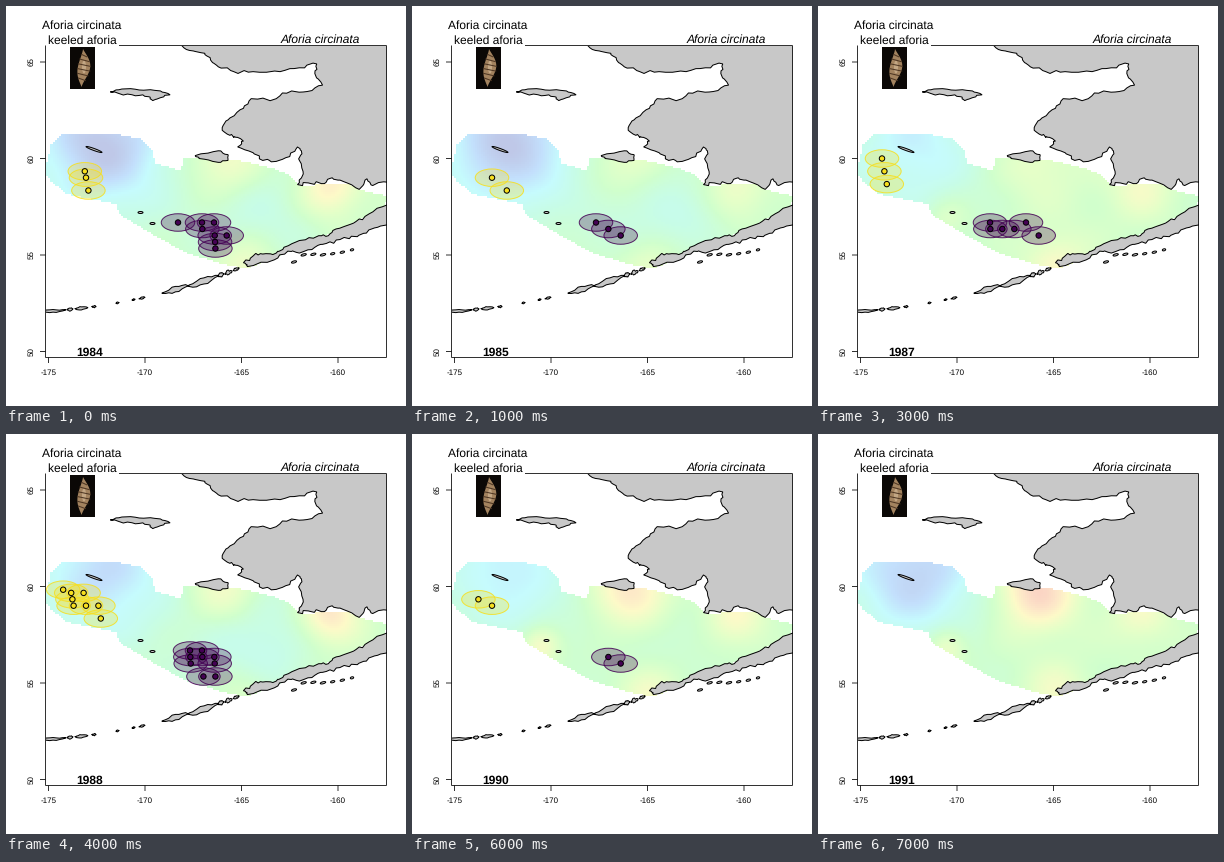
A matplotlib script for the animation above (8000 ms loop, 400x400 px).

```python
import numpy as np
import matplotlib.pyplot as plt
from matplotlib.animation import FuncAnimation
from matplotlib.colors import LinearSegmentedColormap
from matplotlib.patches import Ellipse, Polygon, Rectangle
from matplotlib.path import Path

plt.rcParams["text.hinting"] = "none"

PX = 0.72  # points per pixel at 100 dpi
THIN = 0.8 * PX
FONT = "Liberation Sans"
LEFT, RIGHT, TOP, BOTTOM = 39.5, 380.5, 39.5, 351.5
DEGREE = 19.3  # pixels per degree
YELLOW, TEAL, PURPLE, SLATE = "#f7df1e", "#21908c", "#440154", "#35304f"
LAND = "#c8c8c8"
YEARS = range(1984, 1992)
rng = np.random.default_rng(7)

fig = plt.figure(figsize=(4, 4), dpi=100, facecolor="white")
ax = fig.add_axes([0, 0, 1, 1])
ax.axis("off")

# Coasts as longitude west and latitude north
MAINLAND = [
    (168.3, 66.3), (168.1, 65.85), (167.7, 65.6), (166.9, 65.45),
    (166.6, 65.1), (166.2, 64.75), (165.4, 64.5), (164.4, 64.5),
    (163, 64.5), (162, 64.7), (161.1, 64.9), (161.2, 64.4), (160.8, 63.8),
    (161.6, 63.47), (162.4, 63.5), (163.2, 63.1), (164.5, 63.1),
    (164.9, 62.6), (165.6, 62.1), (166, 61.6), (165.6, 61.2), (165.3, 61.1),
    (164.9, 60.9), (165.2, 60.6), (164.4, 60.3), (163.9, 59.9),
    (163.2, 59.85), (162.5, 60.1), (162.1, 60.6), (161.9, 60.4),
    (162, 59.9), (161.8, 59.2), (162.1, 58.65), (161.4, 58.7), (160.7, 58.7),
    (160.3, 59), (159.7, 58.8), (158.9, 58.4), (158.5, 58.95),
    (158.2, 58.6), (157, 58.8), (156, 59), (156, 66.3)]
PENINSULA = [
    (164.9, 54.6), (164.4, 54.95), (163.9, 55.05), (163.2, 55.1),
    (162.8, 55.4), (162, 55.75), (161, 56), (160.5, 56), (160.1, 56.35),
    (159.2, 56.65), (158.6, 57), (157.7, 57.5), (156.5, 57.9),
    (156.5, 56.7), (157.8, 56.5), (158.4, 56.3), (159, 55.95),
    (159.9, 55.8), (160.6, 55.6), (161.2, 55.4), (162, 55.1),
    (162.6, 55.2), (163.3, 54.75), (164.7, 54.4)]
NUNIVAK = [(167.4, 60.15), (166.2, 60.4), (165.7, 60.2), (165.7, 59.9),
           (166.2, 59.8), (167.2, 60)]
ST_LAWRENCE = [(171.8, 63.45), (171.2, 63.6), (170.3, 63.55), (169.2, 63.5),
               (168.7, 63.3), (169.2, 63.15), (169.6, 63), (169.8, 63.2),
               (170.5, 63.25), (171.3, 63.35)]

SURVEY = [
    (39, 166), (45, 138), (54, 128), (105, 127), (133, 133), (146, 146),
    (148, 157), (174, 165), (177, 153), (200, 150), (240, 156), (268, 163),
    (284, 170), (292, 180), (340, 177), (357, 185), (380, 190), (378, 202),
    (300, 238), (240, 263), (215, 258), (180, 247), (150, 231), (112, 208),
    (110, 198), (60, 188), (46, 177)]

CMAP = LinearSegmentedColormap.from_list("pastel", [
    "#bfc8e8", "#c3dffc", "#c6fbfe", "#c8fde6", "#d0ffcd",
    "#e6ffc8", "#fdfac8", "#fde4c8", "#facdc3"])
# Warm and cold spots: x, y, reach; then their strength by year
SPOTS = [(95, 138, 47), (245, 205, 45), (218, 156, 28), (322, 180, 22),
         (128, 212, 14), (238, 260, 22)]
STRENGTH = {
    1984: [-.50, -.15, .27, .33, 0, .25],
    1986: [-.48, -.20, .18, .08, 0, .20],
    1987: [-.28, .02, .14, .20, .12, .22],
    1988: [-.38, -.20, .27, .38, 0, .15],
    1989: [-.15, -.15, .33, .30, .32, .28],
    1991: [-.43, .00, .45, .20, .25, .20],
}

# Catches as (column, row) cells of the western and eastern survey grids
WEST = {
    1984: [(1, 2), (1, 3), (1, 5)],
    1985: [(1, 3), (2, 5)],
    1986: [(2, 6)],
    1987: [(0, 0), (0, 2), (0, 4)],
    1988: [(-.6, .5), (0, 1), (0, 2), (0, 3), (1, 1), (1, 3), (2, 3), (2, 5)],
    1989: [(-.6, .5), (1, 3), (1, 5), (2, 4), (3, 6)],
    1990: [(0, 2), (1, 3)],
}
EAST = {
    1984: [(0, 0), (2, 0), (2, 1), (3, 0), (3, 2), (4, 2), (3, 3), (3, 4)],
    1985: [(1, 0), (2, 1), (3, 2)],
    1986: [(1, 0), (7.8, 3)],
    1987: [(0, 0), (0, 1), (1, 1), (2, 1), (3, 0), (4, 2)],
    1988: [(1, 0), (1, 1), (1, 2), (2, 0), (2, 1), (3, 1), (3, 2), (2, 4),
           (3, 4)],
    1989: [(3, 1), (3, 2)],
    1990: [(2, 1), (3, 2)],
}


def west(col, row):
    return 64 + 12.4 * col + 1.2 * row, 152.5 + 6.4 * row


def east(col, row):
    return 172 + 12 * col + .35 * row, 216.5 + 6.5 * row


def to_px(points):
    lon, lat = np.array(points, float).T
    return np.column_stack([42.5 + (175 - lon) * DEGREE,
                            152.5 - (lat - 60) * DEGREE])


def rough(pts, amp, parts=4):
    """Split every edge and shake the new points."""
    step = np.roll(pts, -1, axis=0) - pts
    t = np.arange(parts)[None, :, None] / parts
    fine = pts[:, None] + t * step[:, None]
    fine[:, 1:] += rng.normal(0, amp, fine[:, 1:].shape)
    return fine.reshape(-1, 2)


def arc_island(x0, x1, thick):
    """A lens of land lying along the Aleutian arc."""
    x = np.linspace(x0, x1, 9)
    d = x - 40
    mid = 305.5 - .06 * d - .00085 * d ** 2
    half = thick / 2 * np.sin(np.pi * (x - x0) / (x1 - x0))
    jag = rng.normal(0, thick / 8, (2, 9))
    top = np.column_stack([x, mid - half + jag[0]])
    low = np.column_stack([x, mid + half + jag[1]])
    return np.vstack([top, low[::-1]])


def text(x, y, s, size=12, **kw):
    kw = {"ha": "center", "va": "baseline", **kw}
    return ax.text(x, y, s, fontsize=size * PX, family=FONT, zorder=8, **kw)


def line(xs, ys):
    ax.plot(xs, ys, color="black", lw=THIN, zorder=7, snap=False,
            solid_capstyle="butt")


def make_fields():
    gx, gy = np.meshgrid(np.arange(39, 380, 2), np.arange(127, 264, 2))
    cells = np.column_stack([gx.ravel(), gy.ravel()])
    outside = ~Path(SURVEY).contains_points(cells).reshape(gx.shape)
    bumps = [np.exp(-((gx - x) ** 2 + (gy - y) ** 2) / (2 * r * r))
             for x, y, r in SPOTS]
    fields = {}
    for year, amps in STRENGTH.items():
        a, b = rng.uniform(0, 2 * np.pi, 2)
        ripple = .03 * np.sin(gx / 15 + a) * np.cos(gy / 12 + b)
        heat = .5 + ripple + sum(k * s for k, s in zip(amps, bumps))
        fields[year] = np.ma.masked_where(outside, heat)
    for year in (1985, 1990):
        fields[year] = (fields[year - 1] + fields[year + 1]) / 2
    return fields


def add_land(patch, clip):
    patch.set(facecolor=LAND, edgecolor="black", lw=PX, zorder=3)
    ax.add_patch(patch)
    patch.set_clip_path(clip)


def draw_land(clip):
    for coast, amp in [(MAINLAND, .9), (PENINSULA, .8), (NUNIVAK, .5),
                       (ST_LAWRENCE, .5)]:
        add_land(Polygon(rough(to_px(coast), amp)), clip)
    for span in [(34, 60, 3), (61, 67, 3), (69, 82, 3), (86, 90, 2),
                 (110, 113, 1.5), (126, 129, 1.5), (133, 139, 2),
                 (156, 183, 5), (183, 213, 6), (212, 218, 4),
                 (219, 226, 4), (227, 233, 3)]:
        add_land(Polygon(arc_island(*span)), clip)
    for x in np.linspace(288, 346, 7):
        y = 253 - .15 * (x - 288) + rng.normal(0, 1.5)
        add_land(Ellipse((x, y), rng.uniform(3, 6), 2, angle=-15), clip)
    for x, y, w, tilt in [(88, 143.5, 17, 20), (134.5, 206.5, 5, 0),
                          (146.5, 217.5, 5, 0)]:
        add_land(Ellipse((x, y), w, 2, angle=tilt), clip)


def draw_shell():
    ax.add_patch(Rectangle((64, 41), 25, 42, color="#0b0806", lw=0, zorder=6))
    t = np.linspace(0, 1, 25)
    y = 43 + 38 * t
    mid = 77 + 1.5 * np.sin(5 * t)
    half = 6.2 * np.sin(np.pi * t) ** 1.2
    outline = np.vstack([np.column_stack([mid - half, y]),
                         np.column_stack([mid + half, y])[::-1]])
    ax.add_patch(Polygon(outline, color="#a3835f", lw=0, zorder=6))
    for i in range(4, 22, 3):
        ax.plot([mid[i] - half[i], mid[i] + half[i]], [y[i] - 1, y[i] + 1.5],
                color="#4c3522", lw=PX, zorder=6.2)
    ax.add_patch(Ellipse((78, 61), 4, 13, color="#d2b795", alpha=.7, lw=0,
                         zorder=6.1))


def draw_axes():
    line([113, RIGHT], [TOP, TOP])
    line([LEFT, LEFT], [TOP, BOTTOM])
    line([RIGHT, RIGHT], [TOP, BOTTOM])
    line([LEFT, RIGHT], [BOTTOM, BOTTOM])
    for i in range(4):
        x, y = 42.5 + 5 * DEGREE * i, 345.5 - 5 * DEGREE * i
        line([x, x], [BOTTOM, BOTTOM + 5.5])
        line([LEFT - 5.5, LEFT], [y, y])
        text(x, 369, str(-175 + 5 * i), 8)
        text(25.5, y, str(50 + 5 * i), 8, rotation=90, va="center")


def draw_catch(color, x, y):
    size = 33.5, 17.5
    oval = Ellipse((x, y), *size, facecolor=color, alpha=.28, lw=0, zorder=4)
    rim = Ellipse((x, y), *size, fill=False, edgecolor=color, lw=PX,
                  alpha=.85, zorder=4)
    dot = Ellipse((x, y), 5.4, 5.4, facecolor=color, edgecolor="black",
                  lw=PX, zorder=5)
    for p in (oval, rim, dot):
        ax.add_patch(p)
    return [oval, rim, dot]


def catches(year):
    """Colour and place of every catch."""
    for i, cell in enumerate(WEST.get(year, [])):
        yield TEAL if year == 1989 and i else YELLOW, west(*cell)
    for i, cell in enumerate(EAST.get(year, [])):
        yield (TEAL, SLATE)[i] if year == 1986 else PURPLE, east(*cell)


fields = make_fields()
sea = ax.imshow(fields[1984], cmap=CMAP, vmin=0, vmax=1, aspect="auto",
                extent=(38, 380, 264, 126), interpolation="nearest", zorder=1)
ax.set_xlim(0, 400)
ax.set_ylim(400, 0)
stage = Rectangle((LEFT, TOP), RIGHT - LEFT, BOTTOM - TOP, fill=False, lw=0)
ax.add_patch(stage)
sea.set_clip_path(stage)
draw_land(stage)
draw_axes()
draw_shell()
text(76, 23, "Aforia circinata")
text(76, 38, "keeled aforia")
text(314, 37, "Aforia circinata", style="italic")
year_label = text(84, 350, "1984", weight="bold")
marks = []


def update(i):
    year = YEARS[i]
    sea.set_data(fields[year])
    year_label.set_text(str(year))
    while marks:
        marks.pop().remove()
    for color, spot in catches(year):
        marks.extend(draw_catch(color, *spot))
    return [sea, year_label, *marks]


anim = FuncAnimation(fig, update, frames=len(YEARS), interval=1000,
                     init_func=lambda: update(0), repeat=True, blit=False)
plt.show()
```
